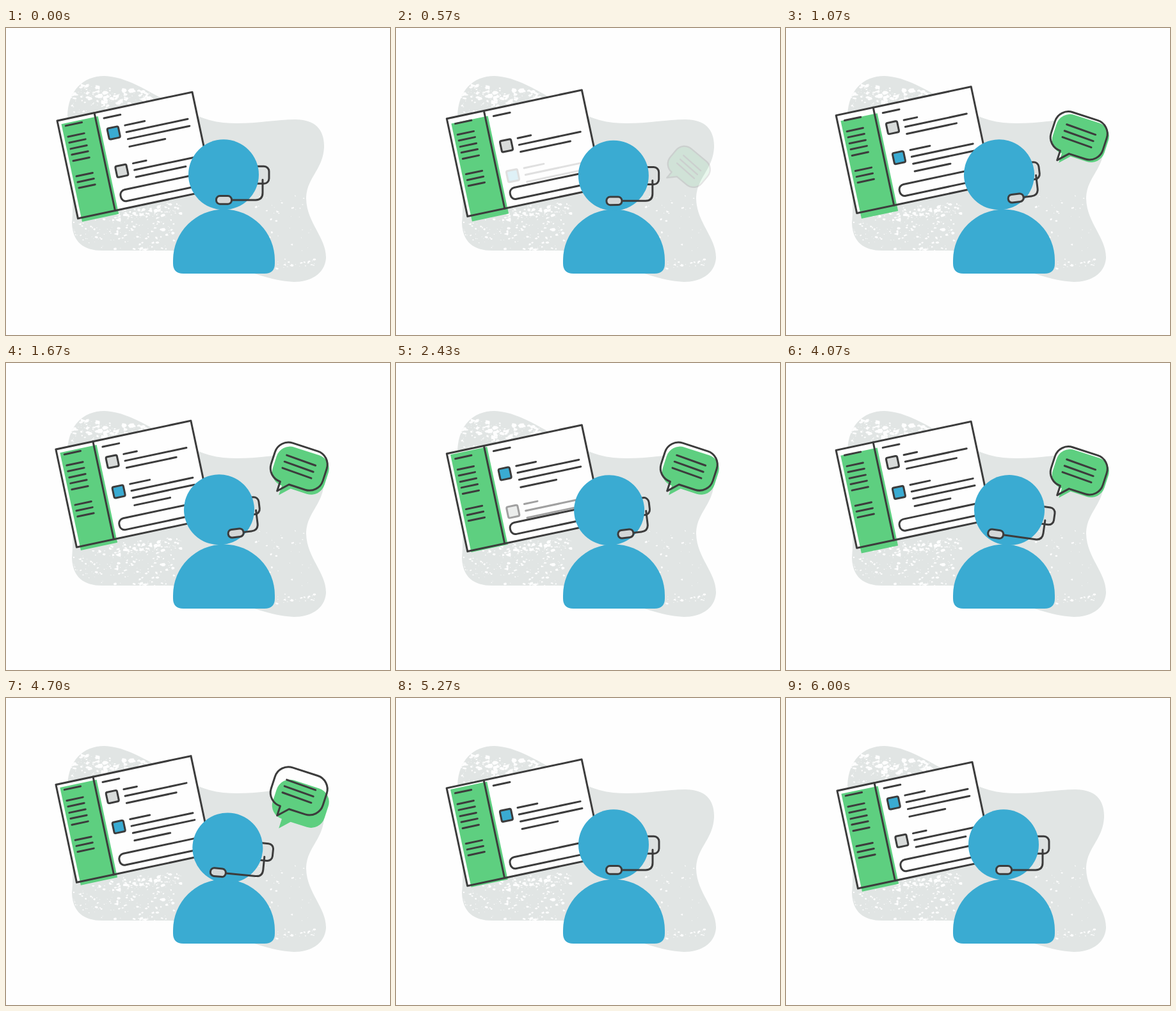
Animation, 600 px wide and 480 px high, one loop 6030 ms. Source, as an HTML page:

```html
<!DOCTYPE html>
<html lang="en">
<head>
<meta charset="utf-8">
<title>Support agent</title>
<style>
  html, body { margin: 0; width: 100%; height: 100%; overflow: hidden; background: #fefefe; }
  svg { display: block; width: 100vw; height: 100vh; }
  .ink { fill: none; stroke: #3c3c3c; stroke-width: 3; stroke-linecap: round; stroke-linejoin: round; }
  .white { fill: #fefefe; }
  .gray { fill: #d8dbda; }
  .blue { fill: #3aabd2; }
  .green { fill: #5ecf80; }
</style>
</head>
<body>
<svg viewBox="0 0 600 480">
  <defs>
    <path id="blob" d="M96 138C97 98 120 75 154 75C206 77 252 125 318 144C362 156 412 143 452 143C484 143 498 160 497 187C495 222 469 235 469 267C470 305 501 328 500 360C498 385 475 397 450 397C425 396 405 389 388 384C340 366 300 348 250 348H150C122 348 104 335 103 305C108 250 95 190 96 138Z"/>
    <clipPath id="inBlob"><use href="#blob"/></clipPath>
    <path id="balloon" d="M-20.5 31.5V47L-6 31.75H20.5a22 22 0 0 0 22-22V-9.75a22 22 0 0 0-22-22H-20.5a22 22 0 0 0-22 22V9.75a22 22 0 0 0 22 21.75Z"/>
  </defs>

  <use href="#blob" fill="#e1e5e4"/>
  <path id="specks" class="white" clip-path="url(#inBlob)"/>

  <g transform="translate(80 145) rotate(-12)">
    <rect id="page" class="white" width="215.7" height="156.3"/>
    <rect id="panel" class="green" x="5.3" y="6.4" width="58.5" height="156.2"/>
    <g id="frame">
      <rect class="ink" width="215.7" height="156.3" stroke-linejoin="miter"/>
      <path id="menu" class="ink"/>
      <g id="rowA">
        <rect class="ink blue" x="-8.8" y="-8.8" width="17.6" height="17.6" rx="2.5" style="fill:#3aabd2"/>
        <path class="ink" d="M19.7-8h31.5M19.7 2.8h98M19.7 14h98.5M19.7 26h57"/>
      </g>
      <g id="rowB">
        <rect class="ink" x="-8.8" y="-8.8" width="17.6" height="17.6" rx="2.5" style="fill:#d8dbda"/>
        <path class="ink" d="M19.7-7.8h21M19.7 2.9h98M19.7 14.1h79.5"/>
      </g>
      <rect class="ink" x="72.5" y="127.3" width="132" height="18.2" rx="8" style="fill:#fefefe"/>
    </g>
  </g>

  <path class="blue" d="M261 368V363A79.5 79.5 0 0 1 420 363V368Q420 384 404 384H277Q261 384 261 368Z"/>
  <g id="head">
    <rect id="cup" class="ink" x="38" y="-13" width="33" height="27" rx="8" style="fill:#dde1e0"/>
    <circle class="blue" r="55"/>
    <path id="boom" class="ink"/>
    <rect id="mic" class="ink" x="-11.5" y="33.3" width="24" height="12.6" rx="5.8" style="fill:#d4d7d7"/>
  </g>

  <g id="bubble">
    <use id="bubbleWhite" href="#balloon" class="white"/>
    <use id="bubbleGreen" href="#balloon" class="green"/>
    <g id="bubbleLine">
      <use href="#balloon" class="ink"/>
      <path class="ink" d="M-23.5-10.8L24.2-9.4M-23.7-.2L24 1.2M-23.7 10.2L24 11.6"/>
    </g>
  </g>
</svg>
<script>
const LOOP = 6030, HALF = 3000;
const $ = id => document.getElementById(id);
const set = (id, name, value) => $(id).setAttribute(name, value);
const clamp = v => Math.max(0, Math.min(1, v));
const mix = (a, b, p) => a + (b - a) * p;
const span = (t, start, length) => clamp((t - start) / length);
const ease = p => (1 - Math.cos(Math.PI * p)) / 2;
const wave = p => (1 - Math.cos(2 * Math.PI * p)) / 2;

// Sidebar items, divider and page title
set('menu', 'd', [10.5, 28, 37.4, 47.3, 56.7, 66.6, 91.2, 100.5, 109.8]
  .map(y => `M11.4 ${y}h25.8`).join('') + 'M59.3 0V156.3M72.3 11.3h26.3');

// Worn texture: small irregular chips scattered over a few areas
let seed = 17;
const rnd = () => (seed = (seed * 16807) % 2147483647) / 2147483647;
function chips(x, y, w, h, count, size, slope = 0) {
  let d = '';
  for (let i = 0; i < count; i++) {
    const px = rnd() * w, cx = x + px, cy = y + px * slope + rnd() * h;
    const r = 0.4 + size * rnd() ** 2.5;
    for (let k = 0; k < 6; k++) {
      const a = k * Math.PI / 3, q = r * (0.5 + rnd());
      d += `${k ? 'L' : 'M'}${(cx + q * 1.4 * Math.cos(a)).toFixed(1)} ${(cy + q * Math.sin(a)).toFixed(1)}`;
    }
    d += 'Z';
  }
  return d;
}
set('specks', 'd',
  chips(100, 100, 60, 38, 65, 2.6) + chips(115, 88, 115, 24, 120, 3, 0.1) +
  chips(105, 290, 160, 40, 120, 1.9) + chips(165, 283, 110, 18, 110, 2.4, -0.1) +
  chips(115, 325, 150, 24, 40, 1.5) + chips(200, 344, 60, 5, 14, 2) +
  chips(385, 262, 85, 40, 24, 1.3) + chips(418, 368, 65, 9, 26, 2, -0.1) +
  chips(395, 305, 90, 70, 16, 1));

function drawWindow(t) {
  const bob = t < HALF ? t / HALF : span(t, HALF, 2900);
  const lag = t < HALF + 350 ? span(t, 350, HALF) : span(t, HALF + 350, 2800);
  const lift = `translate(0 ${-10.5 * wave(bob)})`;
  set('page', 'transform', lift);
  set('frame', 'transform', lift);
  set('panel', 'transform', `translate(0 ${-10.5 * wave(lag)})`);

  // The top message leaves, the other moves up, and the first returns below it
  const s = t < HALF ? t : t - HALF;
  const first = ease(span(s, 0, 1000)), second = ease(span(s, 1770, 1000));
  const swap = (p, top, low, rise) => p < 0.5
    ? [top - rise * p, clamp(1 - p / 0.35)]
    : [low + rise * (1 - p), clamp((p - 0.55) / 0.4)];
  const place = (id, [y, alpha]) => {
    set(id, 'transform', `translate(82.4 ${y})`);
    set(id, 'opacity', alpha);
  };
  place('rowA', second > 0 ? [mix(85, 37, second), 1] : swap(first, 37, 85, 60.7));
  place('rowB', second > 0 ? swap(second, 37, 97.6, 48) : [mix(97.6, 37, first), 1]);
}

function drawHead(t) {
  const turns = [520, 2400, 4500].map(start => span(t, start, 550));
  const [a, b, c] = turns.map(ease);
  const pose = (left, right) => mix(mix(mix(0, left, a), right, b), 0, c);
  const dip = turns.reduce((sum, p) => sum + 5 * Math.sin(Math.PI * p), 0);
  set('head', 'transform',
    `translate(${340 + pose(-7, 9)} ${229.3 + pose(0, 0.8) + dip}) rotate(${pose(-7, 8)})`);
  const slide = pose(21, -16.5), arm = 61 + pose(-4, -3.5);
  set('cup', 'transform', `translate(${pose(-8, 0)} 0)`);
  set('mic', 'transform', `translate(${slide} 0)`);
  set('boom', 'd', `M${arm} 8V28.5Q${arm} 39.6 ${arm - 11} 39.6H${12.5 + slide}`);
}

function drawBubble(t) {
  const enter = ease(span(t, 540, 510));
  const float = 3.95 - 5.65 * Math.cos((t - 2050) / 1500 * Math.PI);
  const rise = -28 * ease(span(t, 4400, 550));
  const riseGreen = -28 * ease(span(t, 4600, 500));
  const drop = 46 * (1 - enter);
  const pose = (dx, dy) => `translate(${457.7 + dx} ${161.7 + dy + drop}) ` +
    `rotate(${mix(40, 18, enter)}) scale(${mix(0.75, 1, enter)})`;
  set('bubbleWhite', 'transform', pose(0, float + rise));
  set('bubbleLine', 'transform', pose(0, float + rise));
  set('bubbleGreen', 'transform', pose(2.5 * enter, mix(float, 6.5 + 0.65 * float, enter) + riseGreen));
  set('bubble', 'opacity', Math.min(span(t, 540, 250), 1 - span(t, 4720, 340)));
}

function draw(now) {
  const t = now % LOOP;
  drawWindow(t);
  drawHead(t);
  drawBubble(t);
}

const begin = performance.now();
function tick() {
  draw(performance.now() - begin);
  requestAnimationFrame(tick);
}
tick();
</script>
</body>
</html>
```
